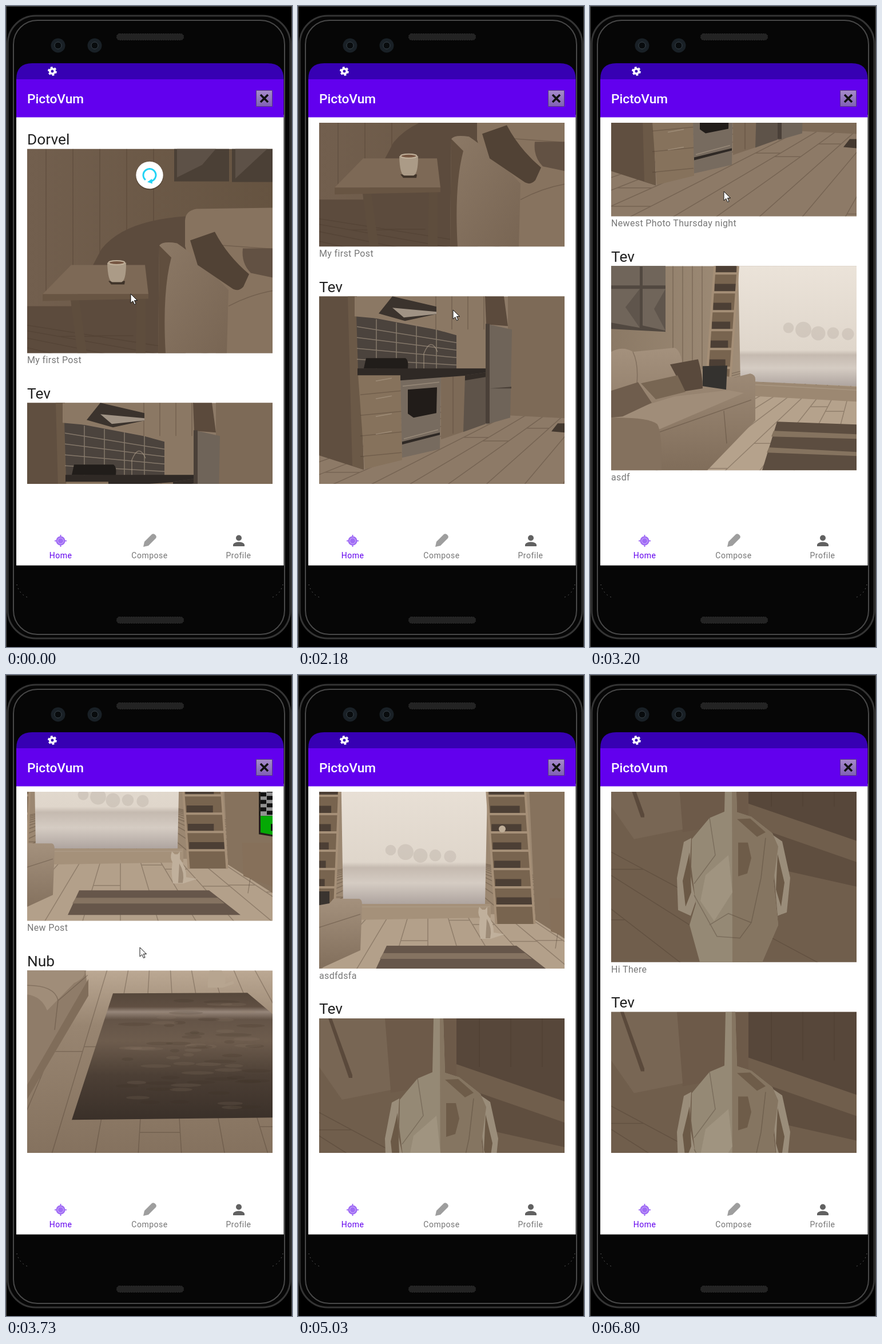
An HTML page that plays this animation: 500x1120 px, repeating every 7680 ms.

```html
<!DOCTYPE html>
<html lang="en">
<head>
<meta charset="utf-8">
<title>Photo feed on a phone</title>
<style>
  html, body { margin: 0; width: 100%; height: 100%; overflow: hidden; background: #000; }
  #stage { display: block; width: 500px; height: 1120px; font-family: Roboto, sans-serif; }
  .title { font-size: 22.7px; font-weight: 500; fill: #fff; }
  .author { font-size: 26.3px; fill: #212121; }
  .caption { font-size: 16px; letter-spacing: .35px; fill: #777; }
  .tab { font-size: 14px; letter-spacing: .5px; text-anchor: middle; fill: #757575; }
  .seam { fill: none; stroke: #46372b; stroke-opacity: .32; stroke-width: 1.5; }
  .gleam { fill: none; stroke: #b3a28e; stroke-opacity: .55; stroke-width: 1.5; }
</style>
</head>
<body>
<svg id="stage" viewBox="0 0 500 1120">
  <defs>
    <linearGradient id="wall"><stop stop-color="#725f4e"/><stop offset="1" stop-color="#64523f"/></linearGradient>
    <linearGradient id="paleWall"><stop stop-color="#8b7965"/><stop offset="1" stop-color="#b5a28c"/></linearGradient>
    <linearGradient id="cushion" x2="1" y2="1"><stop stop-color="#8c7966"/><stop offset="1" stop-color="#786553"/></linearGradient>
    <linearGradient id="sofa" x2="0" y2="1"><stop stop-color="#a4917d"/><stop offset="1" stop-color="#806d5a"/></linearGradient>
    <linearGradient id="floor" x2="0" y2="1"><stop stop-color="#bba893"/><stop offset=".25" stop-color="#988571"/><stop offset="1" stop-color="#7f6c59"/></linearGradient>
    <linearGradient id="glass" x2="0" y2="1">
      <stop stop-color="#ebe3d9"/><stop offset=".7" stop-color="#dfd6cb"/><stop offset=".74" stop-color="#c5bab0"/>
      <stop offset=".85" stop-color="#d5ccc3"/><stop offset="1" stop-color="#aea49f"/>
    </linearGradient>
    <linearGradient id="rug" x2="0" y2="1">
      <stop stop-color="#55473b"/><stop offset=".11" stop-color="#604f42"/><stop offset=".15" stop-color="#96867a"/>
      <stop offset=".21" stop-color="#645447"/><stop offset=".38" stop-color="#6d5c4d"/>
      <stop offset=".65" stop-color="#4c3f35"/><stop offset="1" stop-color="#3a3029"/>
    </linearGradient>
    <linearGradient id="button" x2="0" y2="1"><stop stop-color="#a78bcb"/><stop offset="1" stop-color="#8060b5"/></linearGradient>
    <g id="scenes"></g>
  </defs>

  <rect width="500" height="1120"/>
  <path fill="none" stroke="#555" d="M0 .5H499.500V1120M.5 0V1120"/>
  <g fill="#060606">
    <rect x="3" y="17" width="494" height="1088" rx="49" stroke="#343434" stroke-width="3"/>
    <rect x="13" y="25" width="474" height="1073" rx="42" stroke="#484848" stroke-width="2"/>
  </g>
  <g fill="#232323" stroke="#303030" stroke-dasharray="2 2">
    <rect x="193.500" y="48.500" width="117" height="11" rx="5"/>
    <rect x="193.500" y="1067.500" width="117" height="11" rx="5"/>
  </g>
  <g fill="#192026">
    <circle cx="91" cy="69" r="12.500"/><circle cx="155" cy="69" r="12.500"/>
    <g fill="#080b0d" stroke="#39434a"><circle cx="91" cy="69" r="6"/><circle cx="155" cy="69" r="6"/></g>
  </g>
  <path fill="none" stroke="#aaa" stroke-dasharray="1 6" d="M19 1011Q23 1027 37 1033M484 1011Q480 1027 466 1033"/>

  <path fill="#fff" d="M18 190H485.500V977.500H18Z"/>
  <path fill="#3700b3" d="M18 128Q18 100 46 100H457.500Q485.500 100 485.500 128Z"/>
  <path fill="#6200ee" d="M18 128H485.500V194.500H18Z"/>
  <circle cx="81" cy="114" r="4.300" fill="none" stroke="#fff" stroke-width="3.600"/>
  <circle cx="81" cy="114" r="6.700" fill="none" stroke="#fff" stroke-width="2.400" stroke-dasharray="3.800 3.216"/>
  <text class="title" x="37" y="170">PictoVum</text>
  <path fill="url(#button)" stroke="#56407c" d="M437.500 147.500H465.500V175.500H437.500Z"/>
  <path stroke="#111" stroke-width="3.600" d="M445 155L458 168M458 155L445 168"/>

  <svg x="18" y="204" width="467" height="631" viewBox="18 204 467 631"><g id="feed"></g></svg>

  <g id="spinner">
    <circle cy="2" r="24" opacity=".18"/>
    <circle r="23.700" fill="#fff"/>
    <g id="arc" fill="#22d3f5">
      <path fill="none" stroke="#22d3f5" stroke-width="3" d="M-7.100 8.400A11 11 0 1 1 2 10.800"/>
      <path id="arrowhead" d="M4 6.500L5 15L-4 12Z"/>
    </g>
  </g>

  <g transform="translate(95.500 934.500)" fill="#a06cf5" stroke="#a06cf5" stroke-width="2">
    <path d="M0 -10.500V10.500M-10.500 0H10.500"/><circle r="7"/>
    <circle r="5" fill="none" stroke="#d3bafb" stroke-width="1"/>
  </g>
  <path fill="#9e9e9e" d="M240 945L242 936L255 923Q258 921 261 924T262 930L249 943Z"/>
  <g fill="#616161"><circle cx="407" cy="929.500" r="5"/><path d="M397 944V941Q399 936.500 407 936.500T417 941V944Z"/></g>
  <text class="tab" x="95.500" y="965" style="fill:#6200ee">Home</text>
  <text class="tab" x="251" y="965">Compose</text>
  <text class="tab" x="406.500" y="965">Profile</text>

  <path id="cursor" fill="#fff" stroke="#111" d="M0 0V16L3.800 12.500L6.500 18.500L9 17.400L6.400 11.500H11.500Z"/>
</svg>
<script>
const LOOP = 7680, TICK = 128.3, LAST_TICK = 53;
const WIDTH = 429, HEIGHT = 357;
const byId = id => document.getElementById(id);
const ease = p => { p = Math.min(1, Math.max(0, p)); return p * p * (3 - 2 * p); };
const random = n => { const v = Math.sin(n * 127.1) * 43758.5; return v - Math.floor(v); };
const repeat = (count, make) => Array.from({ length: count }, (_, i) => make(i)).join('');
const shape = (fill, d) => `<path fill="${fill}" d="${d}Z"/>`;
const seam = d => `<path class="seam" d="${d}"/>`;
const gleam = d => `<path class="gleam" d="${d}"/>`;
const backdrop = fill => shape(fill, `M0 0H${WIDTH + 40}V${HEIGHT + 30}H0`);

// Floorboards run to a vanishing point and break at random joints.
function planks(vx, vy, spacing) {
  const count = Math.ceil(1800 / spacing);
  const at = (i, y) => vx + (i - count / 2) * spacing * (y - vy) / (HEIGHT - vy);
  return seam(repeat(count, i => {
    const y = Math.max(0, vy) + (HEIGHT - Math.max(0, vy)) * (.2 + .8 * random(i));
    return `M${at(i, HEIGHT + 30)} ${HEIGHT + 30}L${vx} ${vy}M${at(i, y)} ${y}H${at(i + 1, y)}`;
  }));
}

const boards = (x, count, pitch, height) =>
  seam(repeat(count, i => `M${x + i * pitch} 0V${height}`));

// A leaning ladder shelf with a row of books on each board.
function ladder(x, width, top, rows, pitch, lean) {
  const bottom = top + rows * pitch, left = y => x + lean * y;
  return shape('#78644f', `M${x} 0h${width}L${left(bottom) + width} ${bottom}h${-width}`) +
    repeat(rows, i => {
      const y = top + i * pitch, filled = width * (.6 + .35 * random(i + 3));
      return shape('#4c3f35', `M${left(y) + 3} ${y}v${-pitch * .45}h${filled}v${pitch * .45}`) +
        `<path stroke="#a58f77" stroke-width="4" d="M${left(y)} ${y}h${width}"/>`;
    }) +
    `<path fill="none" stroke="#a58f77" stroke-width="4" d="M${x} 0L${left(bottom)} ${bottom}m${width} 0L${x + width} 0"/>`;
}

const plants = (x, y) => `<g fill="#b5aaa0" opacity=".35">` +
  repeat(5, i => `<circle cx="${x + i * 26}" cy="${y + 12 * random(i)}" r="${8 + 6 * random(i + 9)}"/>`) + '</g>';

const blotches = (x, y, w, h) => repeat(70, i =>
  `<ellipse cx="${x + w * random(i)}" cy="${y + h * random(i + 100)}" rx="${8 + 24 * random(i + 200)}" ry="3"
    fill="${i % 2 ? '#8d7b69' : '#382d24'}" opacity=".16"/>`);

const room = backdrop('#9b8771') + shape('#b3a08a', 'M0 262H469V390H0') + planks(190, 150, 62) +
  shape('#86725d', 'M365 0H469V330L378 272') +
  shape('url(#glass)', 'M38 0H295L290 244H42') + plants(125, 150) +
  shape('#a5917a', 'M38 244H300V268L60 272') + gleam('M42 249H298') +
  ladder(290, 67, 23, 8, 32, .07) + ladder(-30, 67, 23, 7, 32, -.04) +
  '<circle cx="320" cy="113" r="6" fill="#bfae98"/>' +
  shape('#3a342f', 'M0 222H18V266H0') +
  shape('url(#sofa)', 'M-9 248L18 243L25 235H70Q75 236 75 245L72 325L-9 362') + seam('M0 285L72 262') +
  shape('#86705a', 'M403 234H469V315L405 292') + seam('M417 296L413 322') +
  shape('#66564a', 'M118 317H345L400 360H98') + shape('#857361', 'M112 330H360L372 340H106') +
  shape('#c0b09c', 'M280 249L285 254H290L294 249V262Q306 278 305 294L324 297L300 305H282Q278 285 281 268Q276 260 280 249') +
  shape('#9d8b77', 'M293 270Q303 286 299 304H291');

const scenes = {
  table: backdrop('url(#wall)') + boards(33, 5, 47, 260) +
    shape('#5c4b3d', 'M130 175Q170 125 277 118V357H0V275H77') + planks(-500, 230, 90) +
    shape('#4b4036', 'M257 0H353V57H257M358 0H429V58H358') + shape('#5d5147', 'M262 0H330L306 28L262 50M364 0H420L364 52') +
    shape('#87735f', 'M276 125Q277 108 296 105L429 103V357H330L276 170') + seam('M290 165L429 175M352 275Q390 255 429 248') +
    shape('url(#cushion)', 'M231 169Q237 161 262 165Q300 190 352 247L349 357H229') +
    shape('#604e3e', 'M231 169L252 190Q236 250 242 357H229') +
    shape('#514235', 'M285 160L328 145Q350 187 388 219L378 241Q370 250 360 245L298 203') +
    shape('#625143', 'M377 174H429V225L391 217Q374 200 377 174') +
    shape('#5e4d3d', 'M76 264H91L104 357H88M192 262H207V357H190') +
    shape('#7d6956', 'M77 203H206L212 254H27') + shape('#685543', 'M27 254H212V262L27 266') +
    shape('#3f3329', 'M142 231H171L170 237H147') +
    shape('#ab9b87', 'M140 199Q141 232 149 233H165Q173 230 173 199') +
    '<ellipse cx="156.500" cy="199" rx="14" ry="3.500" fill="#765642" stroke="#c0b09a" stroke-width="2"/>',

  kitchen: backdrop('#8d7a67') + planks(560, 90, 75) + shape('#7d6a57', 'M330 0H429V213L330 208') +
    shape('#604f40', 'M0 0H66L78 303L0 278') + shape('#6b5947', 'M50 0H66L78 303L58 296') +
    shape('#4b433d', 'M65 32L240 65V130H68') +
    gleam(repeat(4, i => `M66 ${53 + i * 19}L240 ${81 + i * 13}M${100 + i * 35} ${40 + i * 6}V128`)) +
    shape('#8b7864', 'M62 0H292V130H240V68L150 43L62 35') + boards(204, 4, 28, 58) +
    shape('#3b332d', 'M104 30L128 0L205 18V31L150 43') + shape('#a09385', 'M128 20L205 27V31L148 37') +
    gleam('M183 127V100Q195 70 207 97') +
    shape('#211d1a', 'M78 126L82 108H151Q157 112 155 127') +
    shape('#86725c', 'M68 137H142L145 286L80 302') +
    repeat(4, i => seam(`M72 ${172 + i * 36}L144 ${165 + i * 36}`) + gleam(`M99 ${148 + i * 31}l28 -5`)) +
    shape('#7d6a57', 'M213 134H256L254 236L213 250') + seam('M234 139V240') +
    shape('#776b5f', 'M142 134H213L211 267L145 282') +
    shape('#2f2925', 'M67 126H291V136L142 147V138H67M145 254L211 238V242L145 259') +
    shape('#211c19', 'M155 163L206 159L205 204L165 212L155 205') +
    gleam('M146 157L210 150M148 249L208 233') +
    shape('#5e5349', 'M255 138L291 133V223L252 237') + shape('#332c27', 'M255 138L291 133V141L255 147') +
    shape('#5b4a3c', 'M290 0H323L330 52L292 49') +
    shape('#6f6459', 'M292 48L337 58L334 212L292 224') + shape('#4a4038', 'M291 48H298V222H291M298 161L336 158V161') +
    shape('#43382f', 'M406 236L417 222H429V238'),

  lounge: backdrop('url(#paleWall)') + boards(108, 4, 17, 180) +
    shape('#b5a28c', 'M150 210L429 235V357H150') + planks(440, 130, 60) +
    shape('#514840', 'M0 0H95V115L0 110') + shape('#70655a', 'M0 0H50V34H0M55 0H95V34H55M0 40H50V108L0 99M55 40H95V113L55 104') +
    shape('#5f554c', 'M25 72L50 40V108M75 75L95 40V113') +
    shape('url(#glass)', 'M222 0H429V210L226 201') + plants(310, 108) +
    shape('#9c8872', 'M224 201L429 211V237L224 226') + gleam('M224 206L429 217') +
    ladder(181, 41, 13, 6, 33, -.07) +
    shape('url(#sofa)', 'M0 150Q20 139 38 150L110 143Q122 145 126 180L215 195L243 188Q253 190 252 200V270L168 357H0') +
    shape('#a08d79', 'M0 262L110 228L205 217L232 222L85 285L0 275') +
    seam('M38 150Q48 170 45 206M85 290L245 234M197 253L202 310M126 180L128 215') +
    shape('#59493c', 'M103 172L152 163Q160 190 160 214L128 219') + shape('#34322f', 'M160 175L203 174L201 216L160 210') +
    shape('#6f5d4d', 'M0 218L47 203Q58 220 71 239L20 263L0 265') + shape('#786653', 'M52 205L116 191L130 220L78 233') +
    shape('#84715e', 'M0 265Q65 264 80 276Q89 286 88 357H0') +
    shape('#5c4d40', 'M290 272L429 277V357H264') + shape('#85735f', 'M284 288L429 294V302L280 298M276 317L429 325V332L272 326'),

  room,

  screenRoom: `<g transform="translate(-27 -13)">${room}</g>` +
    shape('#241f1b', 'M405 115L429 112V210L405 206') + shape('#929292', 'M408 118H429V174H408') +
    repeat(8, i => shape('#111', `M${408 + (i % 2) * 11} ${120 + Math.floor(i / 2) * 13 + (i % 2) * 6}h10v7h-10`)) +
    shape('#05a805', 'M408 174H429V207L408 203') + shape('#111', 'M426 188h3v12h-3'),

  carpet: backdrop('url(#floor)') + planks(232, -307, 80) +
    shape('#8f7c69', 'M0 0H102L107 44L0 225') + shape('#a08d79', 'M0 0H100Q104 12 82 22L35 70Q25 45 0 42') +
    shape('#806d5a', 'M107 15V44L0 225V200') + seam('M0 26Q48 26 54 52L48 104M55 52L106 8') +
    shape('url(#rug)', 'M150 40L385 39L429 76V257L78 261') + blotches(175, 50, 230, 190) +
    shape('#b7a590', 'M319 0H340Q350 18 345 24L360 18L362 23L342 30H316Q315 15 319 0'),

  statue: backdrop('#705e4c') + planks(-420, -60, 120) +
    shape('#6d5a49', 'M115 0H240V110L125 130') + shape('#57473a', 'M240 0H429V145L240 80') + boards(280, 3, 55, 85) +
    shape('#78665400', 'M0 0') + shape('#786654', 'M0 0H115L125 125L40 142L0 85') + shape('#5a493b', 'M16 0H22L58 99V104H52') +
    shape('#5f4e3f', 'M265 125L429 182V225L295 195') +
    shape('#9a8d7a', 'M140 140L127 147L115 210L117 266L139 276L148 250L137 198M280 133L299 146L313 210L307 270L291 276L285 205') +
    shape('#6b5946', 'M137 165L125 215L130 260L140 235M291 168L303 218L297 260L288 230') +
    shape('#958975', 'M200 0H217L220 95L245 103L282 132L292 155L284 215L292 292L264 357H155L137 292L148 255L140 190L141 142L172 105L198 94') +
    shape('#857561', 'M211 0H217L220 95L245 103L282 132L292 155L284 215L292 292L264 357H212') +
    shape('#a09480', 'M165 205L205 170L212 235L180 285L156 250') +
    shape('#6e5c49', 'M220 107L243 106L270 130L255 138M222 148H239L245 175L238 202L222 207') +
    seam('M172 105L182 170L145 220M172 292L205 272L245 288L225 315L185 312L145 240M270 140L262 210L245 288')
};
byId('scenes').innerHTML = Object.entries(scenes).map(([id, art]) =>
  `<symbol id="${id}" viewBox="0 0 ${WIDTH} ${HEIGHT}">${art}</symbol>`).join('');

const posts = [
  ['Dorvel', 'table', 'My first Post'],
  ['Tev', 'kitchen', 'Newest Photo Thursday night'],
  ['Tev', 'lounge', 'asdf'],
  ['name', 'screenRoom', 'New Post'],
  ['Nub', 'carpet', 'Nub first picture'],
  ['name', 'carpet', 'New Post'],
  ['Tev', 'room', 'asdfdsfa'],
  ['Tev', 'statue', 'Hi There'],
  ['Tev', 'statue', 'Hi There']
];
byId('feed').innerHTML = posts.map(([author, scene, caption], i) => `
  <g transform="translate(37 ${249.4 + i * 443.9})">
    <text class="author" y="-7.500">${author}</text>
    <use href="#${scene}" width="${WIDTH}" height="${HEIGHT}"/>
    <text class="caption" y="375">${caption}</text>
  </g>`).join('');

const swipes = [
  { start: 1780, duration: 585, distance: 243 },
  { start: 2842, duration: 925, distance: 1275 },
  { start: 4097, duration: 986, distance: 1262 },
  { start: 5600, duration: 560, distance: 432 }
];
const scrollAt = time => swipes.reduce((sum, swipe) =>
  sum + swipe.distance * ease((time - swipe.start) / swipe.duration), 0);

// Pointer stops: time, x, y.
const stops = [
  [0, 218, 503], [128, 230, 690], [1000, 309, 815], [1500, 309, 815], [1780, 277, 769], [2181, 271, 531],
  [2842, 240, 826], [3208, 234, 324], [3721, 234, 476], [4097, 245, 750], [4362, 243, 494],
  [5600, 300, 720], [6170, 351, 580], [6800, 484, 1120]
];
function pointerAt(time) {
  const i = Math.max(1, stops.findIndex(stop => stop[0] >= time));
  const [t0, x0, y0] = stops[i - 1], [t1, x1, y1] = stops[i];
  const p = ease((time - t0) / (t1 - t0));
  return [x0 + (x1 - x0) * p, y0 + (y1 - y0) * p];
}

const show = (id, visible) => { byId(id).style.display = visible ? '' : 'none'; };
const place = (id, transform) => byId(id).setAttribute('transform', transform);

function draw(now) {
  const tick = Math.min(LAST_TICK, Math.floor((now % LOOP + 20) / TICK));
  const time = Math.min(6800, tick * TICK);

  place('feed', `translate(0 ${-scrollAt(time)})`);
  place('cursor', `translate(${pointerAt(time)})`);
  show('cursor', tick < LAST_TICK && (time < 4900 || time > 5100));

  const spinnerY = 295.5 + 31 * ease(time / 300) - 74.5 * ease((time - 390) / 250);
  const scale = 1 - .13 * ease((time - 880) / 130);
  place('spinner', `translate(251 ${spinnerY}) scale(${scale})`);
  place('arc', `rotate(${time * .35})`);
  show('spinner', time < 1120);
  show('arrowhead', time < 390);
  requestAnimationFrame(draw);
}
requestAnimationFrame(draw);
</script>
</body>
</html>
```
